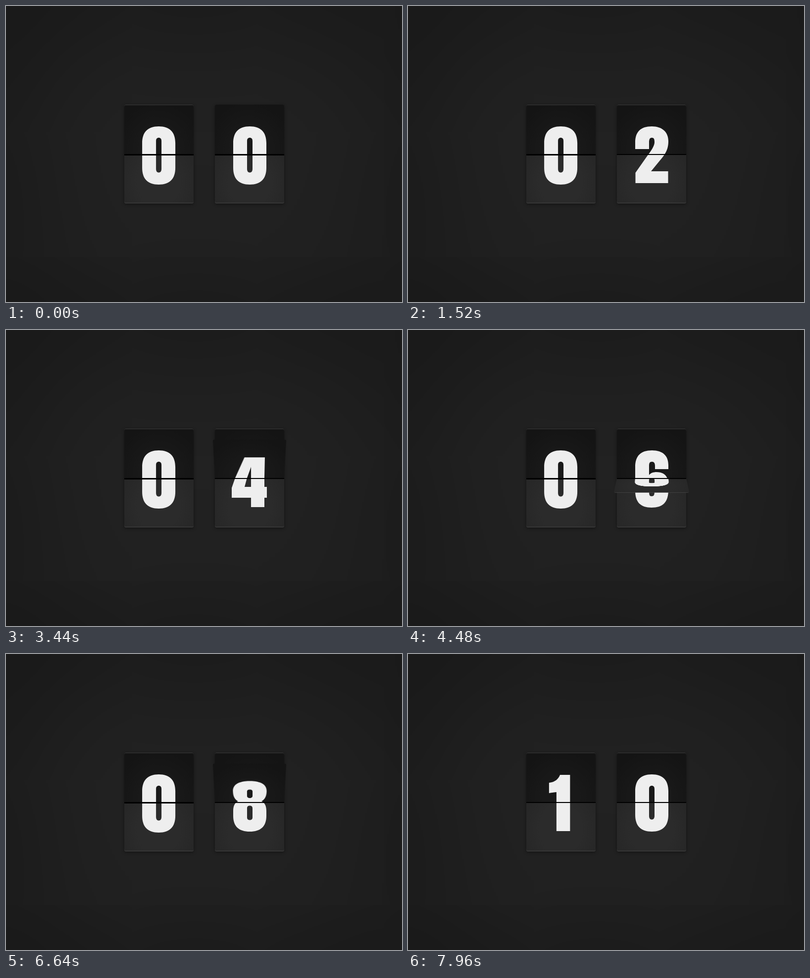
Animation, 800 px wide and 600 px high, one loop 8100 ms. Source, as an HTML page:

```html
<!DOCTYPE html>
<html lang="en">
<head>
<meta charset="utf-8">
<title>Flip counter</title>
<style>
  html, body { margin: 0; width: 100%; height: 100%; overflow: hidden; background: #222; }
  .stage {
    position: relative; width: 800px; height: 600px; overflow: hidden;
    background: #222; box-shadow: inset 0 0 300px rgba(0, 0, 0, .48);
  }
  .card {
    position: absolute; top: 200px; width: 140px; height: 200px;
    border-radius: 3px; perspective: 1200px;
    box-shadow: 0 2px 6px rgba(0, 0, 0, .42);
  }
  .half { position: absolute; left: 0; width: 140px; height: 100px; overflow: hidden; }
  .half::after { content: ""; position: absolute; inset: 0; border-radius: inherit; }
  .half svg { position: absolute; left: 0; width: 140px; height: 200px; fill: #eee; }
  .top {
    top: 0; border-radius: 3px 3px 0 0; transform-origin: 50% 100%;
    background: radial-gradient(ellipse 90px 95px at 50% 90%, #191919 40%, #141414);
  }
  .top svg { top: 0; }
  .bottom {
    top: 100px; border-radius: 0 0 3px 3px; transform-origin: 50% 0;
    background: radial-gradient(ellipse 95px 110px at 50% 55%, #2b2b2b 45%, #252525);
  }
  .bottom svg { top: -100px; }
  .top.fixed::after { box-shadow: inset 0 1px #3b3b3b; }
  .bottom::after { box-shadow: inset 0 -1px #484848; }
  .line { position: absolute; top: 100px; left: 0; width: 140px; background: #000; }
</style>
</head>
<body>
<div class="stage"></div>
<script>
const LOOP = 8100, STEP = 40, BEAT = 800;

const SIX = "M104 82H77V76C77 70 75 67 71 67C66 67 65 70 65 76V94C68 90 73 88 80 88C96 88 104 97 104 113V126" +
  "C104 150 92 160 70 160C48 160 37 149 37 127V78C37 55 48 44 71 44C93 44 104 55 104 74Z" +
  "M65 112V131C65 135 67 137 70.5 137S76 135 76 131V112C76 108 74 106 70.5 106S65 108 65 112Z";

const DIGITS = [
  "M37 78C37 56 48 44 70.5 44S104 56 104 78V126C104 148 93 160 70.5 160S37 148 37 126Z" +
    "M65 74V128C65 133 67 135.5 70.5 135.5S76 133 76 128V74C76 69 74 67 70.5 67S65 69 65 74Z",
  "M69 45H89.3V159H61.8V80C58 80 53 81 46.8 82V61C59 60 66 53 69 45Z",
  "M37 90V77C37 55 48 44 70.5 44C92 44 104 56 104 74C104 92 97 101 87 113L69 135H103.5V159H37.5V138" +
    "L62 103C72 90 76 82 76 76C76 70 75 67 70.5 67C66 67 65 71 65 77V90Z",
  "M37 84V72C37 53 48 44 70 44C93 44 104 53 104 72C104 86 101 92 93 97C101 101 104 107 104 120V127" +
    "C104 150 92 160 70 160C48 160 37 150 37 128V114H65V128C65 135 66 137 70 137C75 137 76 134 76 127V117" +
    "C76 110 74 108 62 108V88C74 88 76 87 76 80V74C76 69 75 67 70 67C66 67 65 69 65 75V84Z",
  "M60 45H100V118H105V140H100V159H73V140H34V120ZM73 70V118H60Z",
  "M40 45H101V66H64V84C68 80 73 78 79 78C96 78 104 88 104 107V124C104 149 93 160 70 160" +
    "C48 160 37 149 37 126V114H65V127C65 134 66 137 70 137C75 137 76 134 76 127V107" +
    "C76 100 75 98 70.5 98C66 98 65 101 65 106H37.5Z",
  SIX,
  "M39 45H103V66C92 95 78 125 73.5 159H44C48 130 62 95 75 68H39Z",
  "M70.5 44C92 44 104 53 104 71C104 84 101 93 94 98C101 102 104 108 104 118V128" +
    "C104 150 92 160 70.5 160S37 150 37 128V118C37 108 40 102 47 98C40 93 37 84 37 71C37 53 49 44 70.5 44Z" +
    "M65 72V83C65 87 67 89 70.5 89S76 87 76 83V72C76 68 74 66.5 70.5 66.5S65 68 65 72Z" +
    "M65 113V131C65 135 67 136.5 70.5 136.5S76 135 76 131V113C76 109 74 107.5 70.5 107.5S65 109 65 113Z",
  SIX
];

function makeHalf(card, kind, dx) {
  const el = document.createElement("div");
  el.className = "half " + kind;
  el.innerHTML = '<svg viewBox="0 0 140 200"><path fill-rule="evenodd"/></svg>';
  card.append(el);
  const path = el.querySelector("path");
  return {
    el,
    set(digit, dy = 0) {
      path.setAttribute("d", DIGITS[digit]);
      const spin = digit === 9 ? " rotate(180 70.5 102)" : "";
      path.setAttribute("transform", `translate(${dx} ${dy})${spin}`);
    },
    tilt(angle, shown) {
      el.style.visibility = shown ? "visible" : "hidden";
      el.style.transform = `rotateX(${angle}deg)`;
    }
  };
}

function makeCard(left, dx) {
  const card = document.createElement("div");
  card.className = "card";
  card.style.left = left + "px";
  document.querySelector(".stage").append(card);
  const top = makeHalf(card, "top fixed", dx);
  const bottom = makeHalf(card, "bottom", dx);
  const fall = makeHalf(card, "top", dx);
  const land = makeHalf(card, "bottom", dx);
  const line = document.createElement("div");
  line.className = "line";
  card.append(line);

  // turn runs 0..1 over half a revolution; fresh means the card has not flipped yet
  return function show(from, to, turn, fresh) {
    const angle = 180 * turn, done = turn >= 1;
    top.set(to);
    bottom.set(done ? to : from, fresh && !done ? 2 : 0);
    fall.set(from);
    land.set(to);
    fall.tilt(-angle, from !== to && angle < 90);
    land.tilt(180 - angle, from !== to && angle >= 90 && !done);
    line.style.height = (fresh && turn < .5 ? 3 : 2) + "px";
  };
}

const tens = makeCard(239, -.9);
const ones = makeCard(422, 0);

function draw() {
  const t = Math.floor(performance.now() % LOOP / STEP) * STEP;
  const n = Math.min(9, Math.floor(t / BEAT));
  const at = t - n * BEAT;
  const last = n === 9;
  // every flip speeds up, only the final one settles slowly
  const turn = last
    ? 1 - (1 - Math.min(1, at / 760)) ** 2.4
    : Math.min(1, at / 720) ** 1.31;
  ones(n, (n + 1) % 10, turn, n === 0);
  tens(0, last ? 1 : 0, last ? turn : 0, true);
  requestAnimationFrame(draw);
}
draw();
</script>
</body>
</html>
```
